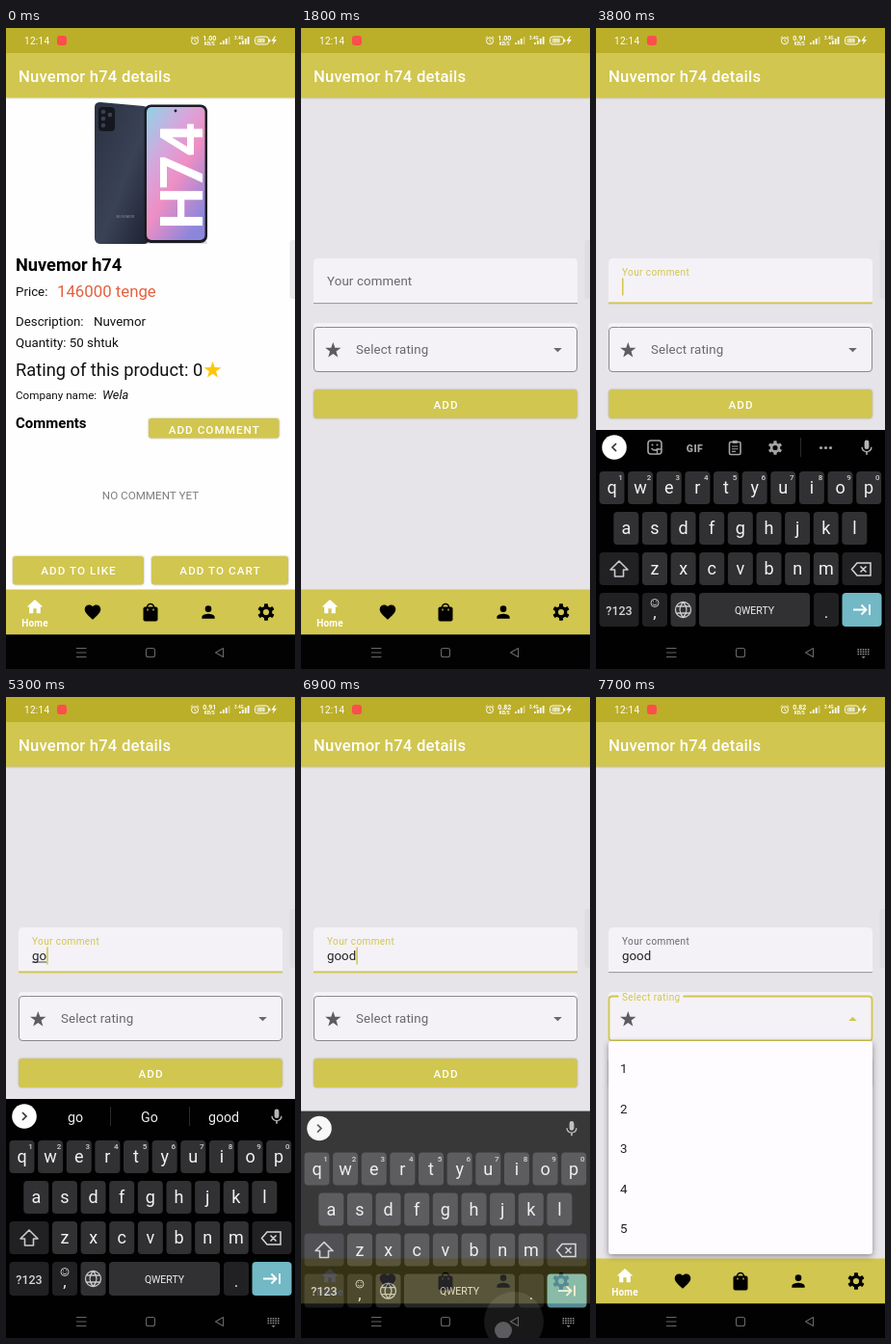
These frames come from a looping animation (300 px wide and 665 px high, 8000 ms). An HTML page:

```html
<!DOCTYPE html>
<html lang="en">
<head>
<meta charset="utf-8">
<title>Product comment form</title>
<style>
html, body { margin: 0; width: 100%; height: 100%; overflow: hidden; background: #000; }
svg { display: block; width: 100%; height: 100%; font-family: Roboto, "Noto Sans", sans-serif; }
.raised { filter: drop-shadow(0 .8px .8px rgba(0,0,0,.28)); }
.menu { filter: drop-shadow(0 2px 3px rgba(0,0,0,.4)); }
</style>
</head>
<body>
<svg id="stage" viewBox="0 0 300 665"></svg>
<script>
const LOOP = 8000;
const GOLD = '#d1c64f', INK = '#69676c', FIELD = '#f4f2f6', RULE = '#8b898e';
const stage = document.getElementById('stage');

// Markup helpers
const rect = (x, y, w, h, r, fill, more = '') =>
  `<rect x="${x}" y="${y}" width="${w}" height="${h}" rx="${r}" fill="${fill}" ${more}/>`;
const text = (x, y, size, str, fill = '#111', more = '') =>
  `<text x="${x}" y="${y}" font-size="${size}" fill="${fill}" ${more}>${str}</text>`;
const mid = (x, y, size, str, fill, more = '') =>
  text(x, y, size, str, fill, 'text-anchor="middle" ' + more);
const line = (d, color, w = 1, more = '') =>
  `<path d="${d}" fill="none" stroke="${color}" stroke-width="${w}" ${more}/>`;
const shape = (d, fill, more = '') => `<path d="${d}" fill="${fill}" ${more}/>`;
const dot = (x, y, r, fill, more = '') => `<circle cx="${x}" cy="${y}" r="${r}" fill="${fill}" ${more}/>`;
const group = (id, body, more = '') => `<g id="${id}" ${more}>${body}</g>`;
const icon = (d, x, y, fill, k = .83) =>
  shape(d, fill, `transform="translate(${x - 12 * k} ${y - 12 * k}) scale(${k})"`);
const button = (x, y, w, h, label, base) =>
  rect(x, y, w, h, 3, GOLD, 'class="raised"') +
  mid(x + w / 2 + .5, base, 11.67, label, '#fff', 'font-weight="500" letter-spacing="1.04"');

function star(cx, cy, r, fill) {
  const pts = Array.from({ length: 10 }, (_, i) => {
    const a = i * Math.PI / 5, q = i % 2 ? r * .4 : r;
    return `${(cx + q * Math.sin(a)).toFixed(2)},${(cy - q * Math.cos(a)).toFixed(2)}`;
  });
  return `<polygon points="${pts.join(' ')}" fill="${fill}"/>`;
}

function gear(cx, cy, k, fill) {
  const teeth = [0, 60, 120, 180, 240, 300].map(a =>
    rect(-2.3, -10, 4.6, 4, .8, fill, `transform="rotate(${a})"`)).join('');
  return `<g transform="translate(${cx} ${cy}) scale(${k})">${teeth}` +
    `<circle r="5.4" fill="none" stroke="${fill}" stroke-width="3.7"/></g>`;
}

const HOME = 'M10 20v-6h4v6h5v-8h3L12 3 2 12h3v8z';
const HEART = 'M12 21.35l-1.45-1.32C5.4 15.36 2 12.28 2 8.5 2 5.42 4.42 3 7.5 3c1.74 0 3.41.81 4.5 2.09C13.09 3.81 14.76 3 16.5 3 19.58 3 22 5.42 22 8.5c0 3.78-3.4 6.86-8.55 11.54z';
const PERSON = 'M12 12a4 4 0 1 0 0-8 4 4 0 0 0 0 8zm0 2c-2.67 0-8 1.34-8 4v2h16v-2c0-2.66-5.33-4-8-4z';
const MIC = 'M12 14a3 3 0 0 0 3-3V5a3 3 0 0 0-6 0v6a3 3 0 0 0 3 3zm5.3-3a5.3 5.3 0 0 1-10.6 0H5a7 7 0 0 0 6 6.7V21h2v-3.3A7 7 0 0 0 19 11z';

function bars(x, lit = 4) {
  return [0, 1, 2, 3].map(i =>
    rect(x + i * 2.9, 15 - i * 2, 1.8, 2 + i * 2, .4, '#fff', i < lit ? '' : 'opacity=".4"')).join('');
}

function appBar() {
  return rect(0, 26, 300, 46.4, 0, GOLD, 'class="raised"') + rect(0, 0, 300, 26, 0, '#bbae29') +
    text(19, 17, 10, '12:14', '#fff', 'letter-spacing=".3"') +
    rect(53, 8, 10, 10, 3, '#fb4f4b') +
    `<circle cx="196" cy="13.3" r="3.5" fill="none" stroke="#fff"/>` +
    line('M196 11.3v2.3l1.5 1M191.7 10.5l2-1.8M200.3 10.5l-2-1.8', '#fff', .9) +
    mid(211.3, 13, 7, '', '#fff', 'id="speed" font-weight="700"') +
    mid(211.3, 18, 4.8, 'KB/S', '#fff', 'font-weight="700"') + bars(222, 3) +
    text(237, 12, 4.6, '3.4G', '#fff', 'font-weight="700"') + bars(242) +
    rect(258.5, 9, 14, 8, 2.6, 'none', 'stroke="#fff"') + rect(260, 10.4, 9, 5.2, 1, '#fff', 'opacity=".45"') +
    mid(265.3, 15.2, 6, '89', '#fff') + rect(273, 11.5, 1.4, 3, .6, '#fff') +
    shape('M279 8.5l-3.6 5h2.5l-1.2 4 4.3-5.4h-2.7l1.6-3.6z', '#fff') +
    text(13, 56, 16.67, 'Nuvemor h74 details', '#fff', 'font-weight="500" letter-spacing=".2"');
}

function phone() {
  return rect(97, 221, 112, 3, 1.5, '#0002') +
    shape('M98 77L143 81Q148 82 148 87V219Q148 224 143 224L97 224Q92 223 92 218V82Q92 77 98 77z', 'url(#back)') +
    rect(96, 82, 17, 25, 4, '#15171f') +
    [[101, 87], [101, 94], [101, 101], [108, 90]].map(([x, y]) => dot(x, y, 2.3, '#3b4050')).join('') +
    mid(124, 197, 3.6, 'NUVEMOR', '#8c91a0', 'letter-spacing=".3"') +
    rect(143.5, 79.5, 65.5, 143.5, 7, '#1b1c24') + rect(146, 82, 60.5, 138, 5, 'url(#screen)') +
    dot(176, 86, 1.4, '#1b1c24') +
    text(0, 0, 62, 'H74', '#fff', 'font-weight="700" letter-spacing="-2" transform="translate(204 209) rotate(-90)"');
}

function details() {
  return rect(0, 72, 300, 511, 0, '#fefefe') + phone() +
    text(10, 252, 18.2, 'Nuvemor h74', '#000', 'font-weight="700"') +
    text(10, 278, 13.3, 'Price:') + text(53, 279, 16.8, '146000 tenge', '#e4603f') +
    text(10, 309, 13.3, 'Description:') + text(91, 309, 13.3, 'Nuvemor') +
    text(10, 331, 13.3, 'Quantity: 50 shtuk') +
    text(10, 360.5, 18.3, 'Rating of this product: 0') + star(214.5, 355, 9.3, '#fdc60a') +
    text(10, 385, 11.67, 'Company name:') + text(100, 385, 12.8, 'Wela', '#111', 'font-style="italic"') +
    text(10, 415, 15, 'Comments', '#000', 'font-weight="700"') +
    button(148, 405, 135.5, 20.5, 'ADD COMMENT', 421) +
    dot(216, 415, 0, '#fff', 'id="ripple" clip-path="url(#addClip)"') +
    mid(150, 488.5, 11.67, 'NO COMMENT YET', '#7d7d7d') +
    button(7, 548, 136, 29.5, 'ADD TO LIKE', 567) + button(151, 548, 142, 29.5, 'ADD TO CART', 567);
}

function form() {
  return rect(0, 72, 300, 511, 0, '#e6e4e8') +
    shape('M13 286V244Q13 239 18 239H282Q287 239 287 244V286z', FIELD) +
    rect(13, 285.2, 274, .9, 0, RULE) + rect(13, 284.4, 274, 1.8, 0, GOLD, 'id="focusLine"') +
    text(27, 267, 13.3, 'Your comment', INK, 'id="label"') +
    text(27, 273, 13.3, '', '#222', 'id="typed"') + rect(27, 274.6, 0, .8, 0, '#222', 'id="under"') +
    rect(27, 259.5, 1.5, 18, 0, GOLD, 'id="caret"') +
    rect(13, 306, 274, 50, 4, FIELD) + line('', INK, 1, 'id="outline"') +
    star(33.3, 334.5, 8.6, '#5e5c61') + text(57, 338, 13.3, 'Select rating', INK, 'id="select"') +
    shape('M-4.3 -2.1H4.3L0 2.2z', INK, 'id="arrow"') +
    button(13.3, 375.3, 273.4, 29.8, 'ADD', 394.8);
}

function bottomNav() {
  return rect(0, 582.5, 300, 47, 0, GOLD) + icon(HOME, 30, 600.5, '#fff') +
    mid(30, 621, 10, 'Home', '#fff', 'font-weight="700" letter-spacing=".2"') +
    icon(HEART, 90, 606, '#000') + rect(142.5, 600.5, 15, 15, 2, '#000') +
    line('M146.5 605v-4a3.5 3.5 0 0 1 7 0v4', '#000', 1.6) +
    line('M147 602.6v2M153 602.6v2', GOLD, 1.3) +
    icon(PERSON, 210, 606, '#000') + gear(270, 606, .87, '#000') +
    rect(0, 629.5, 300, 35.5, 0, '#020202');
}

function dropdown() {
  const items = [1, 2, 3, 4, 5].map((n, i) => text(25, 390 + i * 41.5, 13.3, n, '#222')).join('');
  return `<g class="menu">${rect(13, 357, 274, 221, 3, '#fefcff', 'id="sheet"')}</g>` +
    `<g clip-path="url(#sheetClip)">${items}</g>`;
}

// Keyboard
const PITCH = 29.63, PANEL = '#010101', KEY = '#313134', DARK = '#212124', PALE = '#a3a3a7';
const ROWS = [['qwertyuiop', 16.5, 460], ['asdfghjkl', 31.3, 502], ['zxcvbnm', 61, 544]];
const keys = {};
ROWS.forEach(([chars, x, y]) => [...chars].forEach((c, i) => keys[c] = { x: x + i * PITCH, y }));

function keyboard() {
  const letters = Object.entries(keys).map(([c, k]) =>
    rect(k.x - 13, k.y, 26, 34, 4, KEY) + mid(k.x, k.y + 23, 18, c, '#f2f2f2')).join('');
  const digits = [...'1234567890'].map((d, i) =>
    mid(25.5 + i * PITCH, 469, 8, d, '#d0d0d2', 'font-weight="500"')).join('');
  const tools = rect(54, 428, 14, 14, 3, 'none', `stroke="${PALE}" stroke-width="1.6"`) +
    line('M57.5 436q3.5 4 7 0M68 437h-4.5v5', PALE, 1.3) + dot(58.5, 432.5, 1, PALE) + dot(63.5, 432.5, 1, PALE) +
    mid(102.5, 439.5, 10.5, 'GIF', PALE, 'font-weight="900" letter-spacing=".4"') +
    rect(138.5, 429.5, 11.5, 13, 1.5, 'none', `stroke="${PALE}" stroke-width="1.6"`) +
    line('M141 434h6.5M141 436.7h6.5M141 439.4h4', PALE, 1.1) + rect(141.5, 428, 5.5, 3, 1, PALE) +
    gear(186, 435.5, .72, PALE) + line('M212.5 425v20', '#2a2a2c') +
    [233.5, 238.5, 243.5].map(x => dot(x, 435.5, 1.6, PALE)).join('');
  const words = line('M108.5 425v20M190.5 425v20', '#2a2a2c') +
    [72, 149, 226].map((x, i) => mid(x, 441, 14.2, '', '#eee', `id="word${i}"`)).join('');
  return rect(0, 417, 300, 260, 0, PANEL) + group('tools', tools) + group('words', words) +
    dot(19, 435, 12.8, '#fff') + line('M-2 -4L2 0L-2 4', '#333', 1.7, 'id="chevron"') +
    icon(MIC, 281, 435.5, '#b5b5b8', .8) + letters + digits +
    rect(3.5, 544, 41, 34, 4, DARK) +
    line('M24 553l9 9h-4.5v7h-9v-7h-4.5z', '#c9c9cc', 1.6, 'stroke-linejoin="round"') +
    rect(255.5, 544, 41, 34, 4, DARK) +
    line('M271 555h14v13h-14l-5.5-6.5zM274.5 558.5l6 6M280.5 558.5l-6 6', '#d5d5d8', 1.5) +
    rect(3.5, 586, 41, 35, 4, DARK) + mid(24, 608.5, 12.5, '?123', '#d5d5d8', 'font-weight="500"') +
    rect(48, 586, 26, 35, 4, DARK) + mid(61, 612, 17, ',', '#f2f2f2') +
    `<circle cx="61" cy="596.5" r="4" fill="none" stroke="#c9c9cc"/>` +
    line('M58.8 597.5q2.2 2.5 4.4 0M59.5 594.5v1M62.5 594.5v1', '#c9c9cc', .9) +
    rect(77.5, 586, 26, 35, 4, KEY) +
    line('M82.5 603.5a8 8 0 0 1 16 0a8 8 0 0 1-16 0M83.5 600h14M83.5 607h14M90.5 595.5q-7 8 0 16q7-8 0-16', '#c9c9cc', 1.3) +
    rect(107, 586, 115, 35, 4, KEY) + mid(164.5, 607.5, 10.5, 'QWERTY', '#eee') +
    rect(226, 586, 26, 35, 4, DARK) + mid(239, 612, 17, '.', '#f2f2f2') +
    rect(255.5, 586, 41, 35, 4, '#72b8c5') +
    line('M267 603.5h13M275.5 598.5l5 5-5 5M284 598v11', '#fff', 1.8) +
    group('popup', rect(-13.5, -40, 27, 74, 5, '#505157') + mid(0, -14, 21, '', '#fff', 'id="popChar"'));
}

function systemNav() {
  const keyDots = [0, 1, 2].map(r => [0, 1, 2, 3, 4].map(c =>
    rect(271.5 + c * 2.6, 644 + r * 2.4, 1.6, 1.5, 0, '#8a8a8e')).join('')).join('');
  return dot(221, 648, 31, '#fff', 'id="backRipple"') + dot(210, 657, 9, '#8b8a8d', 'id="touch"') +
    line('M73 643.5h10.5M73 648h10.5M73 652.5h10.5', '#66666a', 1.1) +
    rect(145.5, 643.5, 9, 9, 2, 'none', 'stroke="#66666a" stroke-width="1.1"') +
    line('M225.5 643.5v9l-8-4.5z', '#66666a', 1.1, 'stroke-linejoin="round"') +
    group('imeIcon', keyDots + shape('M275.6 652h4l-2 2z', '#8a8a8e'));
}

stage.innerHTML = `<defs>
  <linearGradient id="back" x2="1" y2="1"><stop stop-color="#2a3142"/><stop offset=".55" stop-color="#3a4256"/><stop offset="1" stop-color="#1d2230"/></linearGradient>
  <linearGradient id="screen" x2=".7" y2="1"><stop stop-color="#8fd3e8"/><stop offset=".35" stop-color="#d6a6dc"/><stop offset=".6" stop-color="#ee8fc4"/><stop offset="1" stop-color="#8c86dc"/></linearGradient>
  <clipPath id="addClip">${rect(148, 405, 135.5, 20.5, 3, '#000')}</clipPath>
  <clipPath id="sheetClip">${rect(13, 357, 274, 221, 3, '#000', 'id="sheetMask"')}</clipPath>
</defs>` +
  group('details', details()) + group('form', form()) + bottomNav() + appBar() +
  group('dropdown', dropdown()) + rect(294.5, 220, 8, 61, 3, '#d9d7dc', 'opacity=".55"') +
  group('keyboard', keyboard()) + systemNav();

const el = {};
stage.querySelectorAll('[id]').forEach(n => el[n.id] = n);
const set = (id, props) => { for (const k in props) el[id].setAttribute(k, props[k]); };
const show = (id, on) => set(id, { visibility: on ? 'visible' : 'hidden' });
const write = (id, s) => { if (el[id].textContent !== s) el[id].textContent = s; };
const ramp = (t, a, b) => Math.min(1, Math.max(0, (t - a) / (b - a)));
const smooth = u => u * u * (3 - 2 * u);
const mix = (a, b, u) => a + (b - a) * u;
const during = (t, spans) => spans.some(([a, b]) => t >= a && t < b);
const last = (t, steps) => steps.reduce((v, [at, s]) => t >= at ? s : v, steps[0][1]);

const TYPED = [[0, ''], [4500, 'g'], [5100, 'go'], [6100, 'goo'], [6500, 'good']];
const PRESSES = [[4400, 'g'], [5000, 'o'], [6000, 'o'], [6400, 'd']];
const HINTS = [[0, ['', '', '']], [4700, ['g', 'G', 'good']], [5250, ['go', 'Go', 'good']],
  [6200, ['goo', 'good', 'Goo']], [6600, ['good', 'Good', 'goods']], [6750, ['', '', '']]];
const BLINK = [[2450, 3380], [3800, 4350], [4500, 5000], [5100, 5600], [6100, 7000]];
const SPEED = [[0, '1.00'], [2000, '0.91'], [6000, '0.82']];

function float(id, u, from, to) {
  set(id, {
    x: mix(from[0], to[0], u), y: mix(from[1], to[1], u),
    'font-size': mix(13.3, 10, u), 'letter-spacing': mix(.12, .4, u)
  });
}

function render(t) {
  write('speed', last(t, SPEED));

  // Tap on the button, then crossfade to the form
  const tap = ramp(t, 1180, 1500);
  set('ripple', { r: 75 * tap, opacity: tap > 0 ? .35 * (1 - ramp(t, 1350, 1600)) : 0 });
  set('form', { opacity: smooth(ramp(t, 1350, 1720)) });
  show('details', t < 1720);

  // Comment field
  const focused = t >= 2400 && t < 7300;
  const typed = last(t, TYPED), width = typed.length * 7.6;
  float('label', smooth(ramp(t, 2400, 2560)), [27, 267], [27, 257]);
  set('label', { fill: focused ? GOLD : INK });
  const grow = focused ? smooth(ramp(t, 2400, 2600)) : 0;
  set('focusLine', { x: 150 - 137 * grow, width: 274 * grow });
  write('typed', typed);
  set('under', { width: t < 6750 ? width : 0 });
  set('caret', { x: 27 + width });
  show('caret', during(t, BLINK));

  // Rating field and its menu
  const open = smooth(ramp(t, 7300, 7460)), active = t >= 7300;
  float('select', open, [57, 338], [27, 315]);
  set('select', { fill: active ? GOLD : INK });
  set('outline', {
    d: `M23.5 310.5H17Q13.5 310.5 13.5 314V353Q13.5 356.5 17 356.5H283Q286.5 356.5 286.5 353V314Q286.5 310.5 283 310.5H${23.5 + 67 * open}`,
    stroke: active ? GOLD : RULE, 'stroke-width': active ? 1.8 : 1
  });
  set('arrow', { transform: `translate(266.5 334) rotate(${180 * open})`, fill: active ? GOLD : INK });
  const drop = 1 - (1 - ramp(t, 7360, 7660)) ** 3;
  set('dropdown', { opacity: Math.min(1, drop * 1.2) });
  set('sheet', { height: 221 * drop });
  set('sheetMask', { height: 221 * drop });

  // Keyboard slides in, later out
  const away = (1 - ramp(t, 2665, 3025)) ** 3, fall = ramp(t, 6790, 7090);
  set('keyboard', {
    transform: `translate(0 ${248 * (away + fall ** 3)})`,
    opacity: (1 - away) * (1 - fall ** 1.4)
  });
  const suggesting = t >= 4700;
  show('tools', !suggesting);
  show('words', suggesting && t < 6750);
  set('chevron', { transform: `translate(19 435) scale(${suggesting ? 1 : -1} 1)` });
  last(t, HINTS).forEach((w, i) => write('word' + i, w));

  const press = PRESSES.find(([at]) => t >= at && t < at + 110);
  show('popup', !!press);
  if (press) {
    const k = keys[press[1]];
    set('popup', { transform: `translate(${k.x} ${k.y})` });
    write('popChar', press[1]);
  }

  // Back press
  const held = ramp(t, 6700, 6820) * (1 - ramp(t, 6900, 7100));
  set('backRipple', { r: 31 * ramp(t, 6700, 6860), opacity: .09 * held });
  set('touch', { opacity: .6 * held });
  show('imeIcon', t >= 2850 && t < 7040);
}

const start = performance.now();
function tick() {
  render((performance.now() - start) % LOOP);
  requestAnimationFrame(tick);
}
tick();
</script>
</body>
</html>
```
